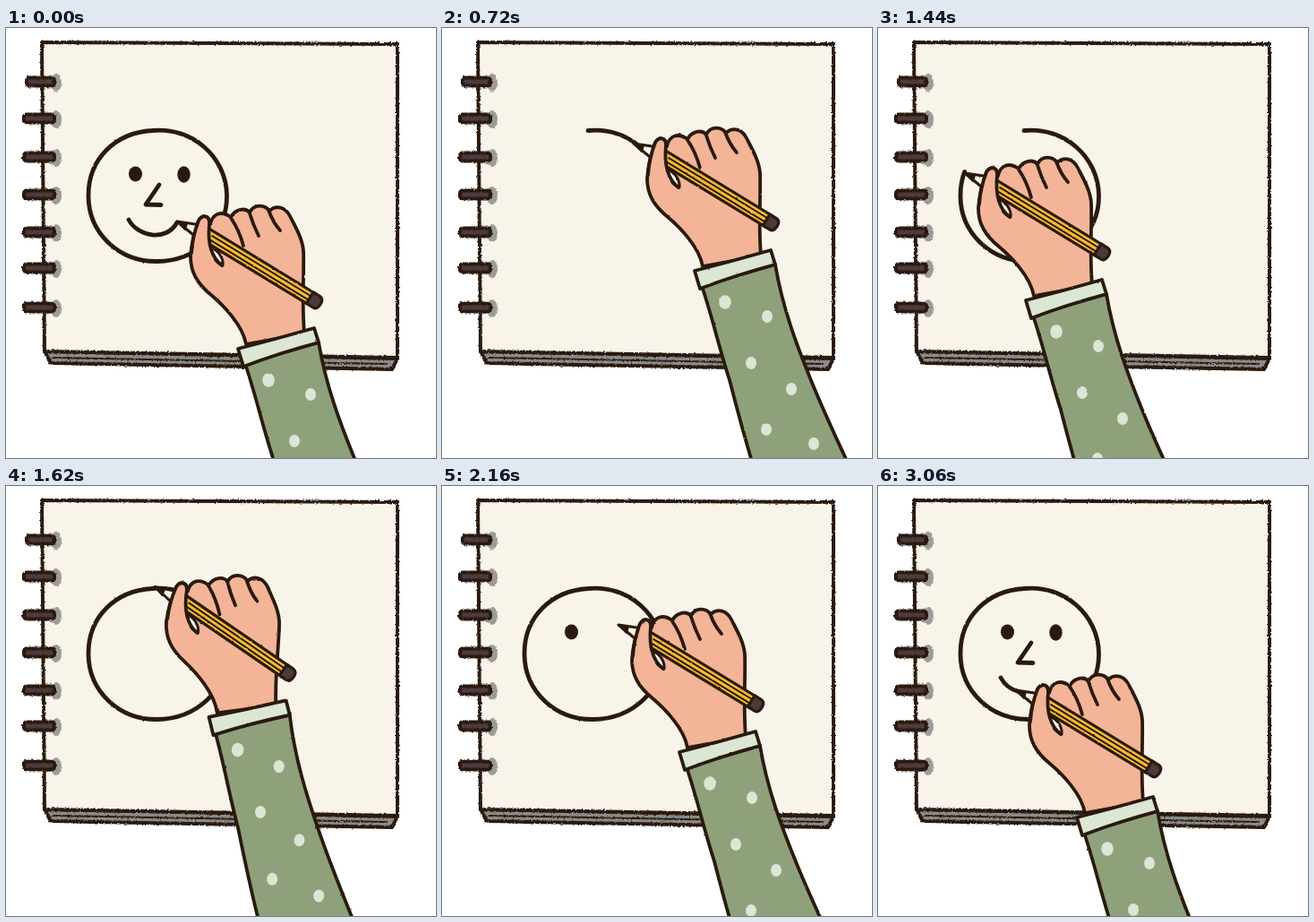
These frames come from a looping animation (480 px wide and 480 px high, 3.24 s). An HTML page:

```html
<!DOCTYPE html>
<html lang="en">
<head>
<meta charset="utf-8">
<title>Drawing a face</title>
<style>
html, body { margin: 0; height: 100%; overflow: hidden; background: #fff; }
svg { display: block; width: 100vw; height: 100vh; }
.ink { stroke: #2a1a0e; stroke-linecap: round; stroke-linejoin: round; }
.line { fill: none; }
.skin { fill: #f3b498; }
.pale { fill: #dce6d4; }
</style>
</head>
<body>
<svg viewBox="0 0 480 480">
  <defs>
    <filter id="rough" filterUnits="userSpaceOnUse" x="0" y="0" width="480" height="480" color-interpolation-filters="sRGB">
      <feTurbulence type="fractalNoise" baseFrequency=".45" numOctaves="2" seed="4"/>
      <feDisplacementMap in="SourceGraphic" scale="3" xChannelSelector="R" yChannelSelector="G"/>
    </filter>
    <filter id="soft" filterUnits="userSpaceOnUse" x="0" y="0" width="480" height="480" color-interpolation-filters="sRGB">
      <feTurbulence type="fractalNoise" baseFrequency=".25" seed="9"/>
      <feDisplacementMap in="SourceGraphic" scale="2" xChannelSelector="R" yChannelSelector="G"/>
    </filter>
  </defs>

  <g id="book" class="ink" filter="url(#rough)" stroke-width="4">
    <path fill="#8c8b89" d="M43 361L50 374L431 381L437 369Z"/>
    <path class="line" stroke-width="2" d="M52 368L425 375"/>
    <path fill="#f8f4ea" d="M40 16L437 18L437 368L43 361Z"/>
    <g id="rings"></g>
  </g>

  <g filter="url(#soft)">
    <g id="face" class="ink" stroke-width="4.8">
      <path class="line" pathLength="1" d="M163 114.5C208 110 246 144 246.500 187C247 229 212 260 169 260.500C126 261 92 229 92 187C92 146 122 117 163 114.500"/>
      <ellipse cx="144.500" cy="163" rx="7.500" ry="8.500" fill="#2a1a0e" stroke="none"/>
      <ellipse cx="198.500" cy="163.500" rx="7.200" ry="9.300" fill="#2a1a0e" stroke="none"/>
      <path class="line" pathLength="1" d="M171 175L156 197L173 197.500"/>
      <path class="line" pathLength="1" d="M137 214C147 233 179 239 191 217"/>
    </g>
  </g>

  <g filter="url(#soft)">
    <g id="hand" class="ink" stroke-width="3.8">
      <path fill="#8fa17a" d="M239 274C250 306 258 342 270 379C279 414 287 444 298 480L310 520L424 520L406 480C390 446 372 407 360 377C345 340 329 298 321 250Z"/>
      <g id="dots" class="pale" stroke="none"></g>
      <path class="skin" d="M240 252C236 230 214 208 201 197C185 184 178 171 178 154C179 140 183 124 187 114C191 107 199 107 200 118C203 105 213 103 223 110C228 101 239 99 244 105C248 96 260 95 266 103C274 96 284 99 289 109C295 121 303 134 304 148C305 174 302 206 305 240Z"/>
      <path class="line" d="M223 111Q232 124 237 142M244 106Q248 119 254 131M265 102Q270 116 278 125"/>
      <path class="pale" d="M231 257Q274 246 316 234L321 250Q276 262 237 277Z"/>
      <path fill="#f7f1e4" stroke-width="3" d="M163 115L190 119L186 134Z"/>
      <path fill="#2a1a0e" stroke-width="2" d="M163 115L174 117L172 124Z"/>
      <g transform="translate(201 133) rotate(31.400)" stroke-width="3.200">
        <path fill="#f6bb35" d="M-8 -7.300H132V7.300H-8Z"/>
        <path class="line" stroke-width="2" d="M0 -2.300H130M0 2.700H130"/>
        <path fill="#4b393b" d="M129 -7.300H138Q143 -7 143 0Q143 7 138 7.300H129Z"/>
      </g>
      <path fill="#fcf9f2" stroke-width="3" d="M201 144C209 147 215 156 214 164C206 161 202 154 201 144Z"/>
      <path class="skin" stroke="none" d="M180 150C181 136 184 123 188 114C192 107 199 108 199 117C197 131 199 146 206 155L198 165L183 162Z"/>
      <path class="line" d="M179 150C180 137 183 124 187 114C191 107 199 108 199 117C197 136 200 154 213 164"/>
    </g>
  </g>
</svg>
<script>
const STEP = 180;
// Pencil tip x, y, drawing progress (one unit per stroke), hand tilt
const poses = [
  [191, 216, 5], [236, 254, 5], [236, 254, 5],
  [163, 115, 0], [214, 129, .12], [246, 188, .27], [204, 252, .44],
  [119, 242, .63], [97, 162, .82], [166, 112.5, 1, 3],
  [143, 159, 1.6], [146, 165, 2],
  [197, 155, 2], [199, 164, 2.7],
  [172, 176, 3], [172, 197, 4],
  [137, 214, 4], [154, 228, 4.4]
];
const byId = id => document.getElementById(id);
const hand = byId('hand');
const strokes = [...byId('face').children];

byId('rings').innerHTML = [60, 101, 144, 186, 228, 268, 312].map((y, i) => {
  const x = i ? 20 : 23;
  return `<ellipse cx="56" cy="${y + 1}" rx="6" ry="10" fill="#9d9a97" stroke="none"/>
    <rect x="${x}" y="${y - 4.5}" width="${54 - x}" height="9" rx="3" fill="#4d3b3f"/>`;
}).join('');

byId('dots').innerHTML = [
  [265, 292], [312, 308], [294, 360], [339, 389], [311, 434], [364, 450], [337, 482]
].map(([x, y], i) => {
  const r = i ? 6 : 6.8;
  return `<ellipse cx="${x}" cy="${y}" rx="${r}" ry="${r + 1}"/>`;
}).join('');

function reveal(el, part) {
  el.style.display = part > 0 ? '' : 'none';
  if (el.tagName === 'ellipse') {
    const x = el.getAttribute('cx'), y = el.getAttribute('cy');
    el.setAttribute('transform', `translate(${x} ${y}) scale(${part}) translate(${-x} ${-y})`);
  } else {
    el.setAttribute('stroke-dasharray', part < 1 ? `${part} 2` : 'none');
  }
}

let shown = -1;
function draw(now) {
  const step = Math.floor(now / STEP) % poses.length;
  if (step !== shown) {
    shown = step;
    const [x, y, progress, tilt = 0] = poses[step];
    hand.setAttribute('transform', `translate(${x} ${y}) rotate(${tilt}) translate(-163 -115)`);
    strokes.forEach((el, i) => reveal(el, Math.min(1, Math.max(0, progress - i))));
  }
  requestAnimationFrame(draw);
}
draw(performance.now());
</script>
</body>
</html>
```
